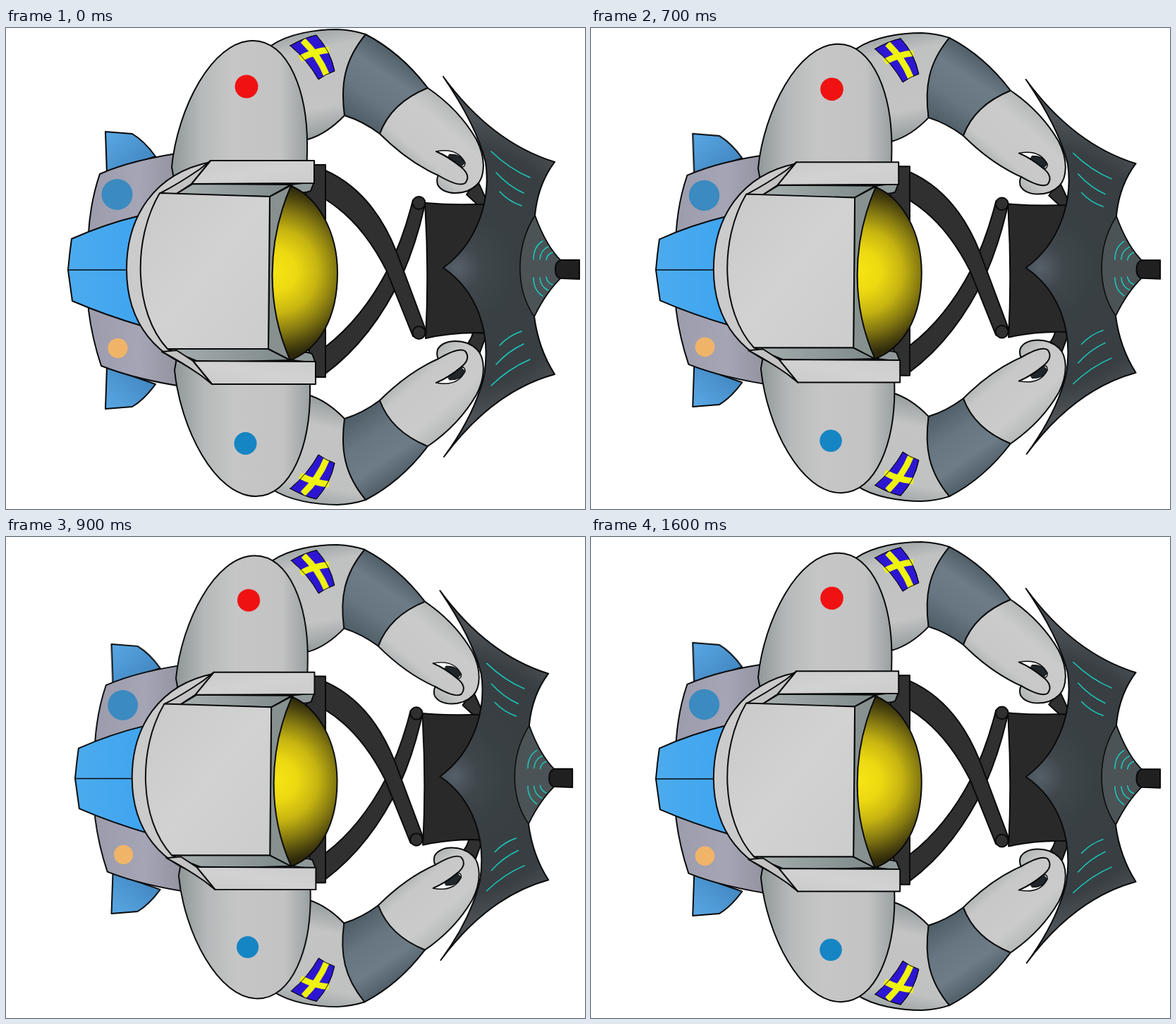
An HTML page for the animation above (1.8 s loop, 821 by 682 pixels).

```html
<!DOCTYPE html>
<html lang="en">
<head>
<meta charset="utf-8">
<title>Diver seen from above</title>
<style>
html, body { margin: 0; width: 100%; height: 100%; overflow: hidden; background: #fff; }
svg { display: block; }
#diver { transform-box: view-box; transform-origin: 0 0; stroke: #08090a; stroke-width: 2; stroke-linejoin: round; stroke-linecap: round; }
.flat { stroke: none; }
.line { fill: none; }
.glow { fill: none; stroke: #19cdbf; stroke-width: 1.5; }
</style>
</head>
<body>
<svg width="821" height="682" viewBox="0 0 821 682">
<defs>
  <linearGradient id="fin" x1="0" y1="0" x2="1" y2="1">
    <stop offset="0" stop-color="#5aa8e4"/><stop offset="1" stop-color="#3d80ba"/>
  </linearGradient>
  <linearGradient id="pack" x1="0" y1="0" x2="1" y2="0">
    <stop offset="0" stop-color="#9c9cac"/><stop offset=".5" stop-color="#a5a5b5"/><stop offset="1" stop-color="#8c8c9a"/>
  </linearGradient>
  <linearGradient id="tank" x1="0" y1="0" x2="1" y2="0">
    <stop offset="0" stop-color="#4cabee"/><stop offset="1" stop-color="#3ea4f0"/>
  </linearGradient>
  <linearGradient id="shoulder" x1="235" y1="0" x2="428" y2="0" gradientUnits="userSpaceOnUse">
    <stop offset="0" stop-color="#8f9897"/><stop offset=".22" stop-color="#b7baba"/><stop offset=".45" stop-color="#c6c6c6"/>
    <stop offset=".8" stop-color="#c3c3c3"/><stop offset="1" stop-color="#989f9f"/>
  </linearGradient>
  <linearGradient id="upper" x1="420" y1="0" x2="450" y2="158" gradientUnits="userSpaceOnUse">
    <stop offset="0" stop-color="#98a0a1"/><stop offset=".2" stop-color="#c0c1c1"/><stop offset=".72" stop-color="#c4c4c4"/><stop offset="1" stop-color="#8f9898"/>
  </linearGradient>
  <linearGradient id="elbow" x1="568" y1="32" x2="496" y2="138" gradientUnits="userSpaceOnUse">
    <stop offset="0" stop-color="#46545e"/><stop offset=".35" stop-color="#6d7c86"/><stop offset=".65" stop-color="#677680"/><stop offset="1" stop-color="#4c5a64"/>
  </linearGradient>
  <linearGradient id="fore" x1="642" y1="115" x2="570" y2="200" gradientUnits="userSpaceOnUse">
    <stop offset="0" stop-color="#b4b7b7"/><stop offset=".3" stop-color="#cbcbcb"/><stop offset=".75" stop-color="#c8c8c8"/><stop offset="1" stop-color="#a5abab"/>
  </linearGradient>
  <linearGradient id="shell" x1="0" y1="0" x2="1" y2="1">
    <stop offset="0" stop-color="#cacaca"/><stop offset=".5" stop-color="#d2d2d2"/><stop offset="1" stop-color="#cccccc"/>
  </linearGradient>
  <linearGradient id="rim" x1="0" y1="0" x2="1" y2="0">
    <stop offset="0" stop-color="#a7afaf"/><stop offset="1" stop-color="#7d8889"/>
  </linearGradient>
  <radialGradient id="gold" cx="382" cy="345" r="120" gradientUnits="userSpaceOnUse">
    <stop offset="0" stop-color="#f6e414"/><stop offset=".25" stop-color="#ecd911"/><stop offset=".5" stop-color="#c6b411"/>
    <stop offset=".72" stop-color="#857911"/><stop offset=".9" stop-color="#4a430e"/><stop offset="1" stop-color="#2d290a"/>
  </radialGradient>
  <radialGradient id="wing" cx="640" cy="340" r="265" gradientUnits="userSpaceOnUse">
    <stop offset="0" stop-color="#566069"/><stop offset=".13" stop-color="#40474c"/><stop offset=".3" stop-color="#394043"/>
    <stop offset=".65" stop-color="#383e42"/><stop offset=".82" stop-color="#4e5357"/><stop offset="1" stop-color="#393d41"/>
  </radialGradient>

  <g id="fins">
    <path fill="url(#fin)" d="M141 147L179 150Q196 160 212 182L143 206Z"/>
  </g>

  <g id="marks" class="glow">
    <path d="M688 175Q714 200 743 212M695 205Q712 224 734 234M700 232Q713 246 731 252"/>
    <path d="M748 328Q748 310 761 302M757 328Q758 315 769 310M766 329Q767 321 775 318"/>
  </g>

  <g id="arm">
    <path fill="url(#upper)" d="M376 25C400 8 440 2 470 2Q492 3 510 9Q478 55 480 124Q455 150 428 158L405 120Z"/>
    <path fill="url(#elbow)" d="M510 9Q560 35 598 85Q548 108 530 150Q506 132 480 124C474 80 480 45 510 9Z"/>
    <path fill="url(#fore)" d="M598 85Q642 115 667 158C681 185 679 211 668 222C652 238 620 238 612 222Q610 214 613 209Q570 190 530 150Q546 106 598 85Z"/>
    <path fill="#fff" stroke-width="1.5" d="M610 175Q640 169 651 191Q651 198 645 197Q630 183 610 175Z"/>
    <path fill="#20262a" stroke-width="1" d="M629 179Q646 178 650 192L645 197Q636 188 627 183Z"/>
    <path class="line" d="M613 209Q642 226 651 220Q660 209 645 197Q628 183 610 175"/>
    <g stroke-width="1">
      <path fill="#2d16d2" d="M403 25Q422 14 440 10Q460 32 466 61Q452 66 443 73Q428 46 403 25Z"/>
      <path class="line" stroke="#eef30f" stroke-width="9" stroke-linecap="butt" d="M421 17.5Q444 40 454.500 66.500M417 43.500Q436 33 458 31"/>
      <path class="line" d="M403 25Q422 14 440 10Q460 32 466 61Q452 66 443 73Q428 46 403 25Z"/>
    </g>
  </g>

  <g id="sleeve">
    <path fill="url(#shoulder)" d="M235 197C243 115 292 18 350 18C400 18 429 90 427 175L426 225L240 225Z"/>
  </g>

  <g id="collar">
    <path fill="#8f9999" d="M404 222L437 218L432 231Q420 236 411 230Z"/>
    <path fill="url(#shell)" d="M290 188L437 188L437 220L263 221Z"/>
    <path fill="#c4c4c4" d="M290 188L263 221L240 236L219 234Q246 220 275 200Z"/>
  </g>
</defs>

<g id="diver">
  <!-- backpack -->
  <use href="#fins"/>
  <use href="#fins" transform="matrix(1 0 0 -1 0 687)"/>
  <path fill="url(#pack)" d="M262 175Q180 186 133 207Q120 245 117 290L117 400Q122 440 135 479Q185 499 262 510Z"/>
  <path fill="url(#tank)" d="M88 343Q90 320 93 299Q140 278 190 266L198 424Q140 407 94 387Q91 365 88 343Z"/>
  <path class="line" stroke-width="1.500" d="M88 343H175"/>
  <circle class="flat" cx="157.500" cy="236" r="22" fill="#3b8ac0"/>
  <circle class="flat" cx="158.500" cy="454" r="14" fill="#f0b469"/>

  <!-- linkage and handle -->
  <g fill="#303030">
    <path d="M453 452Q505 412 541 343Q563 300 577 244L594 250Q582 305 562 350Q520 440 453 490Z"/>
    <path d="M453 202Q520 232 554 318L595 428L577 437L540 345Q505 275 453 243Z"/>
    <path fill="#292929" d="M594 248Q640 252 684 249L684 433Q640 430 595 440Q600 345 594 248Z"/>
    <path d="M653 236L668 215L684 250L668 250Z"/>
    <path d="M651 452Q660 442 662 432L682 433L672 460Z"/>
    <rect x="425" y="194" width="28" height="301"/>
    <circle cx="585.500" cy="248" r="9"/>
    <circle cx="585.500" cy="432" r="9"/>
  </g>

  <!-- wing -->
  <path fill="url(#wing)" d="M620 69Q688 162 778 190Q754 222 750 266Q766 310 788 331L788 353Q766 374 749 409Q755 455 778 491Q690 515 621 608Q664 550 678 493C688 430 668 373 620 340C668 305 688 245 680 190Q667 138 620 69Z"/>
  <path fill="#4b5356" stroke-width="1.500" d="M750 266C722 310 722 370 749 409Q766 374 788 353L788 331Q766 310 750 266Z"/>
  <use href="#marks"/>
  <use href="#marks" transform="matrix(1 0 0 -1 0 682)"/>
  <path fill="#202020" d="M813 329H787Q779 331 779 342Q779 354 787 355L813 356Z"/>

  <!-- arms -->
  <use href="#arm"/>
  <use href="#arm" transform="matrix(1 0 0 -1 0 678)"/>
  <use href="#sleeve"/>
  <use href="#sleeve" transform="matrix(1 0 0 -1 4 682)"/>
  <circle class="flat" cx="341" cy="83" r="16.500" fill="#f01212"/>
  <circle class="flat" cx="339.500" cy="589" r="16" fill="#1685c3"/>

  <!-- helmet -->
  <path fill="#cbcbcb" d="M290 190C210 206 171 268 171 342C171 416 212 474 290 487Z"/>
  <path fill="url(#rim)" d="M240 236L265 221L404 222L374 239Z"/>
  <path fill="url(#rim)" d="M229 455L372 455L404 471L275 474Z"/>
  <use href="#collar"/>
  <use href="#collar" transform="matrix(1 0 0 -1 2 693)"/>
  <path fill="#87918f" d="M374 239L404 223L412 347L403 471L372 455Z"/>
  <path fill="url(#gold)" d="M404 224C443 240 470 290 470 347C470 410 445 455 403 471C369 395 369 305 404 224Z"/>
  <path fill="url(#shell)" d="M218 234L374 239L372 455L229 455C181 403 179 300 218 234Z"/>
</g>
</svg>
<script>
// start time, x, y, x scale, y scale
const steps = [
  [0, 0, 0, 1, 1],
  [500, 2.47, 1, 0.9945, 0.9956],
  [700, 5.18, 5, 0.9863, 0.9852],
  [900, 12.4, 9, 0.9726, 0.972],
  [1400, 9.9, 7, 0.978, 0.9778],
  [1600, 5.18, 5, 0.9863, 0.9852],
  [1800, 0, 0, 1, 1]
];
const loop = 1800;
document.getElementById("diver").animate(
  steps.map(([t, x, y, sx, sy]) => ({
    offset: t / loop,
    easing: "step-end",
    transform: `translate(${x}px, ${y}px) scale(${sx}, ${sy})`
  })),
  { duration: loop, iterations: Infinity }
);
</script>
</body>
</html>
```
